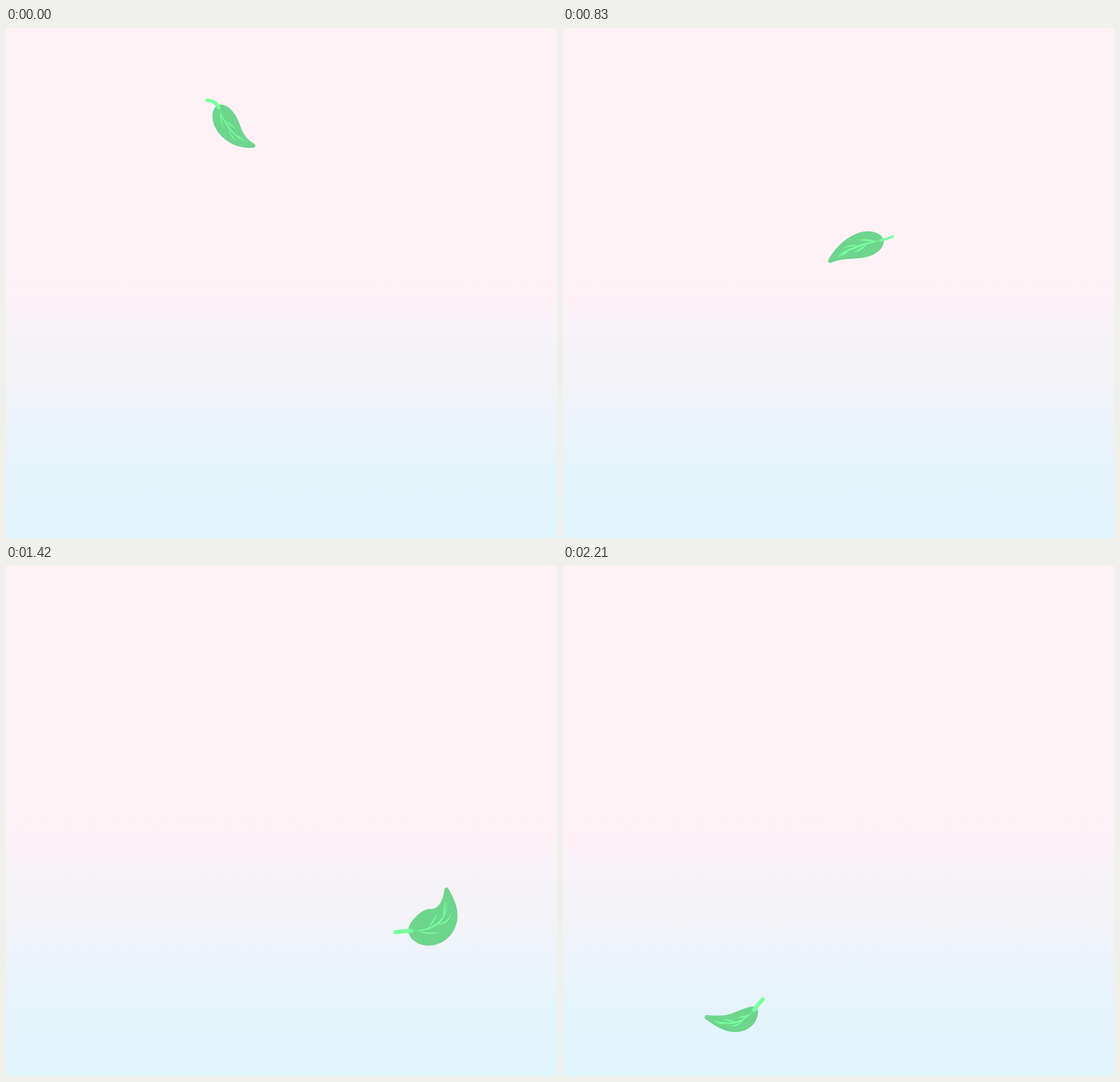
These frames come from a looping animation (778x720 px, 2.54 s). An HTML page with a canvas:

```html
<!DOCTYPE html>
<html lang="en">
<head>
<meta charset="utf-8">
<title>Falling leaf</title>
<style>
  html, body { margin: 0; width: 100%; height: 100%; overflow: hidden; }
  canvas {
    display: block;
    background: linear-gradient(#fff2f6 0, #fff2f6 340px, #fdf1f8 398px, #f7f3f8 422px,
      #f3f3f8 500px, #eef3fb 545px, #e9f4fb 590px, #e3f5fb 650px, #e0f5fc 720px);
  }
</style>
</head>
<body>
<canvas id="stage" width="778" height="720"></canvas>
<script>
const ctx = document.getElementById('stage').getContext('2d');
const LOOP = 2540, TICKS_PER_MS = 0.024, LAST = 53;
const EDGE = 6; // rounds the outline of the blade

// stem, base, tip: places on the stage. bend: sideways pull on the spine, leftward positive.
// lines: stem and vein thickness. glide: how far the leaf follows its heading, sag: extra drop.
const poses = [
  { tick: 0, stem: [284, 102], base: [300, 111], tip: [349, 166], bend: [-.10, -.24], width: .185, lines: [5, 1.8], glide: 130, sag: 0 },
  { tick: 6, stem: [617, 255], base: [631, 237], tip: [630, 175], bend: [.03, -.38], width: .22, lines: [6, 1.8], glide: 60, sag: 0 },
  { tick: 15, stem: [584, 183], base: [569, 187], tip: [518, 225], bend: [-.07, -.10], width: .185, lines: [3.4, 2.4], glide: 200, sag: 70 },
  { tick: 27, stem: [226, 322], base: [256, 304], tip: [370, 351], bend: [.03, -.20], width: .205, lines: [3.8, 4], glide: 130, sag: 0 },
  { tick: 34, stem: [550, 517], base: [570, 515], tip: [622, 457], bend: [-.35, -.46], width: .29, lines: [6, 2.4], glide: 100, sag: 0 },
  { tick: 45, stem: [501, 530], base: [493, 540], tip: [418, 583], bend: [0, .23], width: .185, lines: [4, 2.2], glide: 70, sag: 0 },
  { tick: 53, stem: [282, 612], base: [271, 625], tip: [203, 637], bend: [.34, .20], width: .165, lines: [5.5, 2.4], glide: 0, sag: 0 }
].map(prepare);

// Adds centre, heading and length, and puts the shape in units of that length.
function prepare(pose) {
  const { stem, base, tip, bend, width, lines } = pose;
  const x = (base[0] + tip[0]) / 2, y = (base[1] + tip[1]) / 2;
  const dx = tip[0] - base[0], dy = tip[1] - base[1], len = Math.hypot(dx, dy);
  let heading = Math.atan2(dy, dx);
  if (heading > Math.PI / 3) heading -= 2 * Math.PI;
  const sx = (stem[0] - x) / len, sy = (stem[1] - y) / len;
  const c = dx / len, s = dy / len;
  const shape = [len, sx * c + sy * s, sx * s - sy * c, ...bend, width, ...lines];
  return { ...pose, x, y, heading, shape };
}

const mix = (a, b, u) => a + (b - a) * u;
const bezier = (a, b, c, d, u) =>
  a * (1 - u) ** 3 + 3 * b * u * (1 - u) ** 2 + 3 * c * u * u * (1 - u) + d * u ** 3;

// The leaf travels tip first, so each path leaves and arrives along its heading.
function leafAt(tick) {
  const next = Math.max(1, poses.findIndex(p => p.tick >= tick));
  const a = poses[next - 1], b = poses[next];
  const u = (tick - a.tick) / (b.tick - a.tick), q = a.glide;
  return {
    x: bezier(a.x, a.x + q * Math.cos(a.heading), b.x - q * Math.cos(b.heading), b.x, u),
    y: bezier(a.y, a.y + q * Math.sin(a.heading), b.y - q * Math.sin(b.heading), b.y, u)
      + a.sag * Math.sin(Math.PI * u),
    heading: mix(a.heading, b.heading, u * u),
    shape: a.shape.map((v, i) => mix(v, b.shape[i], u))
  };
}

// A curved sliver, thickest in the middle.
function sliver(a, mid, b, thickness) {
  const dx = b[0] - a[0], dy = b[1] - a[1], k = thickness / Math.hypot(dx, dy);
  const cx = 2 * mid[0] - (a[0] + b[0]) / 2, cy = 2 * mid[1] - (a[1] + b[1]) / 2;
  ctx.beginPath();
  ctx.moveTo(...a);
  ctx.quadraticCurveTo(cx - dy * k, cy + dx * k, ...b);
  ctx.quadraticCurveTo(cx + dy * k, cy - dx * k, ...a);
  ctx.fill();
}

function drawLeaf({ x, y, heading, shape }) {
  const [len, stemX, stemY, c1, c2, width, stemLine, veinLine] = shape;

  // Point at t along the spine; side -1..1 goes from the right edge to the left one.
  const at = (t, side = 0) => {
    const slope = 3 * (1 - t) * (1 - 3 * t) * c1 + 3 * t * (2 - 3 * t) * c2;
    const off = side * width * Math.sin(Math.PI * t ** .62) / Math.hypot(1, slope);
    return [t - .5 - slope * off, bezier(0, c1, c2, 0, t) + off];
  };

  ctx.save();
  ctx.translate(x, y);
  ctx.rotate(heading);
  ctx.scale(len, -len);
  ctx.lineJoin = ctx.lineCap = 'round';

  ctx.fillStyle = ctx.strokeStyle = '#6dd58c';
  ctx.lineWidth = EDGE / len;
  ctx.beginPath();
  const steps = 30;
  for (let i = -steps; i <= steps; i++) ctx.lineTo(...at(1 - Math.abs(i / steps), Math.sign(i)));
  ctx.closePath();
  ctx.fill();
  ctx.stroke();

  ctx.fillStyle = ctx.strokeStyle = '#78ff9f';
  ctx.lineWidth = stemLine / len;
  const reach = Math.hypot(stemX + .5, stemY) / 2 / Math.hypot(1, 3 * c1);
  ctx.beginPath();
  ctx.moveTo(stemX, stemY);
  ctx.quadraticCurveTo(-.5 - reach, -reach * 3 * c1, ...at(.02));
  ctx.stroke();

  const vein = veinLine / len;
  sliver(at(0), at(.42), at(.85), vein);
  for (let i = 0; i < 4; i++) {
    const t = .1 + .16 * i, side = i % 2 ? 1 : -1;
    sliver(at(t), at(t + .14, side * .32), at(t + .3, side * .55), vein * .8);
  }
  ctx.restore();
}

const start = performance.now();
function draw() {
  const time = (performance.now() - start) % LOOP;
  const tick = Math.min(LAST, Math.floor(time * TICKS_PER_MS + .05));
  const held = tick > 0 && tick % 7 % 5 === 0; // some drawings stay for two ticks
  ctx.clearRect(0, 0, 778, 720);
  drawLeaf(leafAt(held ? tick - 1 : tick));
  requestAnimationFrame(draw);
}
draw();
</script>
</body>
</html>
```
